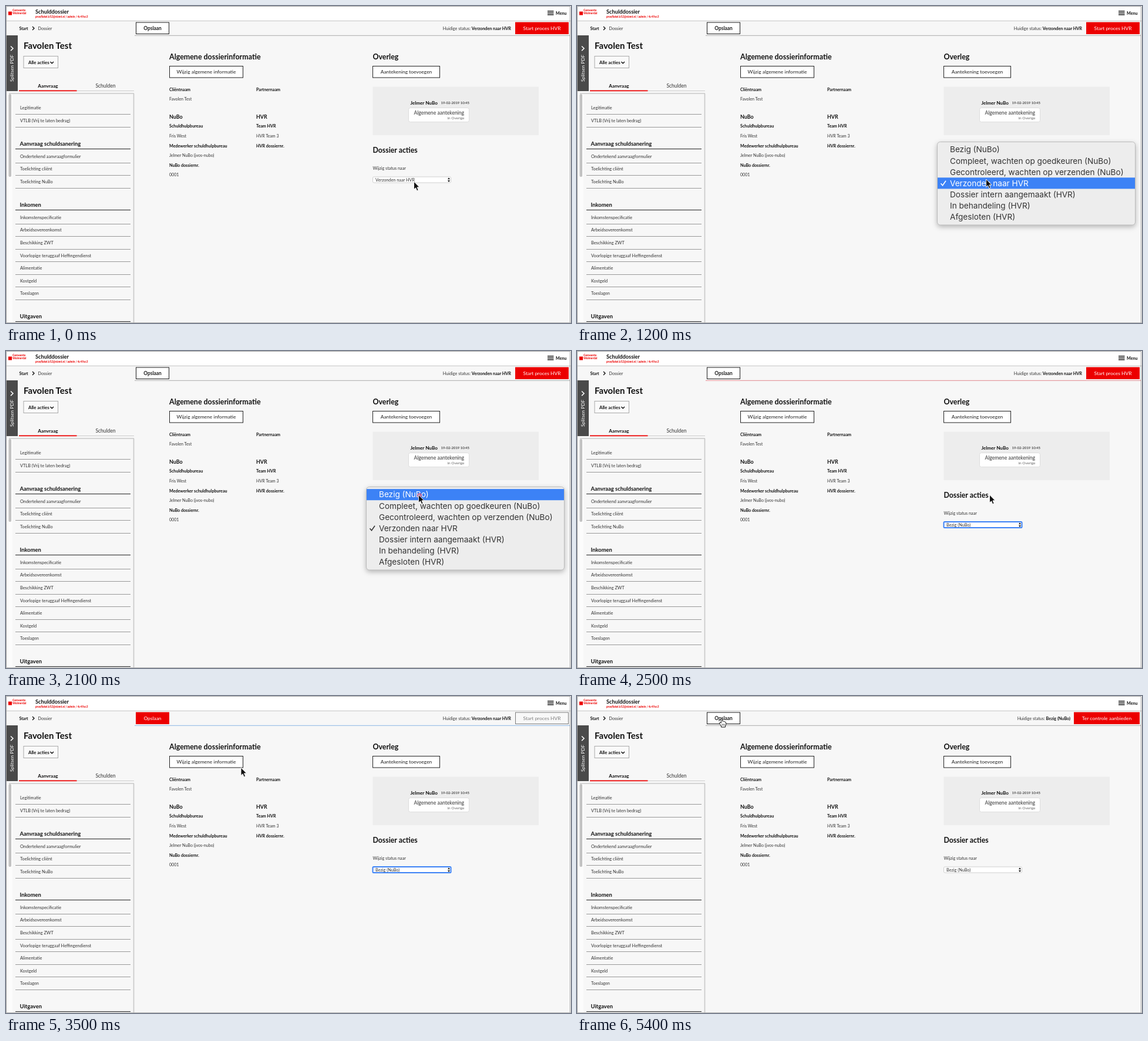
An HTML page for the animation above (6.6 s loop, 962 by 540 pixels).

```html
<!DOCTYPE html>
<html lang="nl">
<head>
<meta charset="utf-8">
<title>Schulddossier</title>
<style>
html, body { margin: 0; width: 100%; height: 100%; overflow: hidden; background: #f7f7f7; }
svg { display: block; width: 962px; height: 540px; font-family: Lato, "Open Sans", sans-serif; }
.menu { font-family: Inter, Roboto, sans-serif; }
</style>
</head>
<body>
<svg viewBox="0 0 962 540"><g id="page"></g><g id="live"></g></svg>
<script>
const LOOP = 6600, TICK = 100;
const RED = '#ec0000', BLUE = '#3c82f6', INK = '#111', SOFT = '#333';
const ORG = 'NuBo', BANK = 'HVR', CLIENT = 'Favolen Test', WORKER = 'Jelmer ' + ORG;

// Text is placed by the middle of its capitals.
const text = (x, mid, size, str, fill = SOFT, extra = '') =>
  `<text x="${x}" y="${mid + size * 0.36}" font-size="${size}" fill="${fill}" ${extra}>${str}</text>`;
const bold = (x, mid, size, str, fill = INK, extra = '') =>
  text(x, mid, size, str, fill, 'font-weight="700" ' + extra);
const rect = (x, y, w, h, fill, extra = '') =>
  `<rect x="${x}" y="${y}" width="${w}" height="${h}" fill="${fill}" ${extra}/>`;
const path = (d, stroke, width = 1, fill = 'none') =>
  `<path d="${d}" fill="${fill}" stroke="${stroke}" stroke-width="${width}"/>`;
const hline = (x1, x2, y, color, width = 1) => path(`M${x1} ${y}H${x2}`, color, width);
const middle = 'text-anchor="middle"';

function button(x, y, w, h, label, fill = '#fff', edge = '#222', ink = '#222', weight = 400) {
  return rect(x, y, w, h, fill, `stroke="${edge}"`) +
    text(x + w / 2, y + h / 2, 8.45, label, ink, `${middle} font-weight="${weight}"`);
}

function section(title, mid, items) {
  const head = title ? bold(23.5, mid, 9.4, title) + hline(16, 212, mid + 9, '#222') : '';
  return head + items.map((item, i) => {
    const y = mid + 21.7 + i * 21.55;
    return text(24, y, 7.4, item) + hline(16, 212, Math.round(y + 10.5) + 0.5, '#999');
  }).join('');
}

function sidebar() {
  return bold(30, 68, 15, CLIENT) +
    rect(30, 85.5, 58.5, 20, '#fafafa', 'stroke="#aaa"') + bold(38, 95.7, 7.8, 'Alle acties') +
    path('M75.5 95l2.7 2.7L81 95', INK, 1.5) +
    bold(71.5, 136, 8.2, 'Aanvraag', INK, middle) + text(169.5, 136, 8.5, 'Schulden', SOFT, middle) +
    hline(120, 218, 144.5, '#ccc') + hline(22, 120.5, 144.3, RED, 1.8) +
    rect(0, 50, 20, 95, '#4a4a4a') + path('M8 68.5l4 3.8l-4 3.8', '#fff', 1.5) +
    text(0, 0, 8.2, 'Splitsen PDF', '#fff', `${middle} transform="translate(10 106) rotate(-90)"`) +
    rect(4, 150, 7, 390, '#fcfcfc') + rect(4.5, 150, 4.5, 141, '#c2c2c2', 'rx="2"') +
    hline(5, 218, 149, '#c8c8c8', 1.6) + path('M217.5 149V540', '#c8c8c8', 1.6) +
    section('', 151.8, ['Legitimatie', 'VTLB (Vrij te laten bedrag)']) +
    section('Aanvraag schuldsanering', 234.5,
      ['Ondertekend aanvraagformulier', 'Toelichting cliënt', 'Toelichting ' + ORG]) +
    section('Inkomen', 338.5, ['Inkomstenspecificatie', 'Arbeidsovereenkomst', 'Beschikking ZWT',
      'Voorlopige teruggaaf Heffingendienst', 'Alimentatie', 'Kostgeld', 'Toeslagen']) +
    section('Uitgaven', 528.5, []);
}

function header() {
  return rect(0, 0, 962, 25, '#fff') + hline(0, 962, 25.3, '#c4c4c4') +
    rect(4, 9.5, 6, 6, RED) +
    bold(11, 7.7, 4.85, 'Gemeente', RED) + bold(11, 12.7, 4.85, 'Wolmerdal', RED) +
    bold(50, 9.7, 9.25, 'Schulddossier') +
    bold(50, 17.8, 4.85, 'proefloket.k52@vlomt.nl / admin / 4c49ec3', RED, 'font-style="italic"') +
    [8.8, 11.8, 14.8].map(y => hline(922, 932.5, y, INK, 1.5)).join('') +
    bold(936, 12.3, 7.2, 'Menu') +
    bold(22.5, 38, 7.1, 'Start') + path('M45 35l3 3l-3 3', INK, 1.4) + text(54.5, 38, 7.2, 'Dossier');
}

function details() {
  const labels = [[278, 142, 'Cliëntnaam'], [426, 142, 'Partnernaam'], [278, 204.7, 'Schuldhulpbureau'],
    [426, 204.7, 'Team ' + BANK], [278, 238, 'Medewerker schuldhulpbureau'],
    [426, 238, BANK + ' dossiernr.'], [278, 271, ORG + ' dossiernr.']];
  const values = [[278, 158.5, CLIENT], [278, 221.3, 'Fris West'], [426, 221.3, BANK + ' Team 3'],
    [278, 254.3, WORKER + ' (jvos-nubo)'], [278, 287.3, '0001']];
  return bold(278, 86.5, 12.45, 'Algemene dossierinformatie') +
    button(278.5, 102.5, 125, 19.5, 'Wijzig algemene informatie') +
    bold(278, 189, 8.9, ORG) + bold(426, 189, 8.9, BANK) +
    labels.map(([x, y, s]) => bold(x, y, 7.15, s)).join('') +
    values.map(([x, y, s]) => text(x, y, 7.1, s)).join('');
}

function notes() {
  return bold(624.5, 86.5, 12.4, 'Overleg') +
    button(624.5, 102.5, 114, 19.5, 'Aantekening toevoegen') +
    rect(624.5, 137.5, 282.5, 82.5, '#ededed') +
    bold(688.5, 165, 8.15, WORKER) + text(740.5, 165.3, 5.9, '19-02-2019 10:45', INK) +
    rect(685.5, 173.5, 103, 24, '#fff', 'rx="3" stroke="#ddd"') +
    text(694.5, 181.5, 8.6, 'Algemene aantekening') +
    text(780.5, 191, 6.4, 'in Overige', '#666', 'text-anchor="end"') +
    bold(624.5, 245.7, 12.3, 'Dossier acties') + text(624.5, 276.5, 7.25, 'Wijzig status naar');
}

const frame = path('M0.5 540V0.5H960.5V540', '#a0a0a0') + hline(0, 962, 539.5, '#b0b0b0');

// Linear interpolation between rows of [time, ...values].
function track(t, keys) {
  const i = keys.findIndex(k => k[0] > t);
  if (i === 0) return keys[0].slice(1);
  if (i < 0) return keys[keys.length - 1].slice(1);
  const a = keys[i - 1], b = keys[i], f = (t - a[0]) / (b[0] - a[0]);
  return a.slice(1).map((v, n) => v + (b[n + 1] - v) * f);
}
const mix = (a, b, f) => `rgb(${a.map((v, i) => Math.round(v + (b[i] - v) * f))})`;
const R = [236, 0, 0], W = [255, 255, 255], K = [30, 30, 30], GREY = [125, 125, 125], PALE = [248, 248, 248];

const pointer = [[0, 694.5, 299], [1100, 694.5, 299], [1200, 696.5, 295], [1800, 702.5, 245],
  [3200, 702.5, 245], [3500, 400, 122], [3900, 246.5, 38]];
const dirty = [[2500, 0], [2700, 0.7], [2900, 1], [5000, 1], [5400, 0]];
const menuShow = [[100, 0], [200, 1], [2300, 1], [2500, 0]];
const options = [`Bezig (${ORG})`, `Compleet, wachten op goedkeuren (${ORG})`,
  `Gecontroleerd, wachten op verzenden (${ORG})`, `Verzonden naar ${BANK}`,
  `Dossier intern aangemaakt (${BANK})`, `In behandeling (${BANK})`, `Afgesloten (${BANK})`];

function toolbar(t) {
  const [p] = track(t, dirty), saved = t >= 5100;
  const rule = t < 2500 || saved ? '#aaa' : t < 3300 ? '#e2868c' : '#8ab6e4';
  const x = saved ? 846.5 : 867.5;
  return hline(219, 960, 50.3, rule) +
    button(221.5, 28, 56, 19.5, 'Opslaan', mix(W, R, p), mix(K, R, p), mix(K, W, p), p > 0.5 ? 400 : 700) +
    (t >= 4200 && !saved ? rect(220, 26.5, 59, 22.5, 'none', `rx="1.5" stroke="${BLUE}" stroke-width="2"`) : '') +
    text(saved ? 840 : 860, 38.2, 7.22, `Huidige status: <tspan font-weight="700" fill="${INK}">` +
      options[saved ? 0 : 3] + '</tspan>', SOFT, 'text-anchor="end"') +
    button(x, 28, 957.5 - x, 19.5, saved ? 'Ter controle aanbieden' : 'Start proces ' + BANK,
      mix(R, PALE, p), mix(R, GREY, p), mix(W, GREY, p));
}

function select(t) {
  const focus = t >= 2400 && t < 4200;
  return rect(624.5, 291, 133, 10, '#fff', focus ? `rx="1.5" stroke="${BLUE}" stroke-width="2"` : 'rx="2" stroke="#d0d0d0"') +
    text(629, 296.2, 7.3, options[t < 2400 ? 3 : 0]) +
    path('M752 295.2l2-3l2 3zM752 297l2 3l2-3z', 'none', 0, INK);
}

function menu(t, y) {
  const [alpha] = track(t, menuShow);
  if (!alpha) return '';
  const active = t === 2300 ? -1 : Math.floor((y - 235) / 19.07);
  const rows = options.map((s, i) => {
    const mid = 244.6 + i * 19.07, ink = i === active ? '#fff' : '#333';
    return (i === active ? rect(614, mid - 9.5, 336, 19.1, BLUE) : '') +
      text(635, mid, 13.6, s, ink) +
      (i === 3 ? path(`M619.5 ${mid + 0.5}l3 3.5l5.5 -8`, ink, 1.6) : '');
  }).join('');
  return `<g class="menu" opacity="${alpha}">` +
    rect(613.5, 231.5, 337, 141.5, '#ededed',
      'rx="5" stroke="#bbb" style="filter:drop-shadow(0 3px 4px #0004)"') + rows + '</g>';
}

function cursor(t, x, y) {
  const click = [100, 2000, 4200].some(c => t >= c && t < c + 300);
  const dot = click ? `<circle cx="${x + 1.5}" cy="${y + 1}" r="4" fill="#f03050" opacity=".5"/>` : '';
  const hand = path('M-1.2 8V1.2Q0-.6 1.2 1.2V5Q2.8 4 3.4 5.6Q5 4.8 5.4 6.3Q7.2 5.8 7.2 7.8V10.5L6 13V15H-1V13L-4 9Q-4.4 7-2.6 7.2Z', '#111', 1, '#fff') +
    path('M.5 9.5v3M2.5 9.5v3M4.5 9.5v3', '#111', 0.7);
  const arrow = path('M0 0V13.5L3.1 10.7L5.2 15.7L7.6 14.7L5.5 9.8H9.6Z', '#fff', 0.9, '#111');
  return dot + `<g transform="translate(${x} ${y})">${x < 278 && y < 50 ? hand : arrow}</g>`;
}

document.getElementById('page').innerHTML = header() + sidebar() + details() + notes() + frame;
const live = document.getElementById('live');
let last = -1;

function draw(now) {
  const t = Math.floor(now % LOOP / TICK) * TICK;
  if (t !== last) {
    const [x, y] = track(t, pointer);
    live.innerHTML = toolbar(t) + select(t) + menu(t, y) + cursor(t, x, y);
    last = t;
  }
}

let start;
function loop(now) {
  start ??= now;
  draw(now - start);
  requestAnimationFrame(loop);
}
draw(0);
requestAnimationFrame(loop);
</script>
</body>
</html>
```
